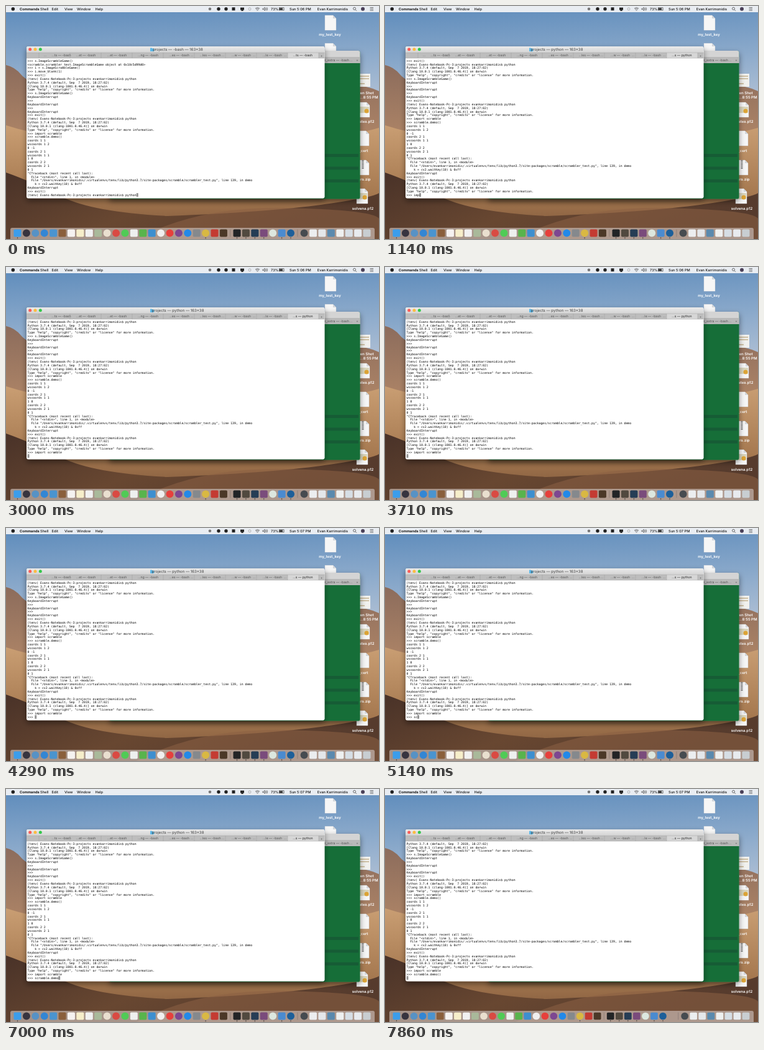
Recreate the animation shown at these times as an HTML page. Size 600 by 375 pixels, loop 8000 ms.

```html
<!DOCTYPE html>
<html lang="en">
<head>
<meta charset="utf-8">
<title>Shell session</title>
<style>
html, body { margin: 0; width: 100%; height: 100%; overflow: hidden; background: #6d4c38; }
svg { display: block; width: 100vw; height: 100vh; }
text { font-family: Inter, Roboto, sans-serif; white-space: pre; text-rendering: geometricPrecision; }
.mono text { font: 4.85px "DejaVu Sans Mono", "Noto Sans Mono", monospace; fill: #000; }
.menu text { font-size: 5.7px; fill: #151515; }
.label { font-size: 6px; font-weight: 600; fill: #fff; text-anchor: middle; }
.tab { font-size: 5.2px; fill: #555; text-anchor: middle; }
</style>
</head>
<body>
<svg viewBox="0 0 600 375" preserveAspectRatio="none">
  <defs>
    <linearGradient id="sky" x2=".12" y2="1">
      <stop stop-color="#5d8bbb"/><stop offset=".5" stop-color="#8faccc"/><stop offset="1" stop-color="#c2cbd9"/>
    </linearGradient>
    <linearGradient id="mountain" x2="0" y2="1">
      <stop stop-color="#8c6c5c"/><stop offset="1" stop-color="#b58a69"/>
    </linearGradient>
    <linearGradient id="sand" x2="0" y2="1">
      <stop stop-color="#c99e73"/><stop offset=".6" stop-color="#a67950"/><stop offset="1" stop-color="#7b5439"/>
    </linearGradient>
    <linearGradient id="shade" x2="1" y2=".4">
      <stop stop-color="#493228"/><stop offset=".5" stop-color="#684731"/><stop offset="1" stop-color="#563b2d"/>
    </linearGradient>
    <linearGradient id="bar" x2="0" y2="1">
      <stop stop-color="#ebebeb"/><stop offset="1" stop-color="#d3d3d3"/>
    </linearGradient>
    <filter id="shadow" x="-10%" y="-10%" width="120%" height="130%">
      <feDropShadow dx="0" dy="4" stdDeviation="5" flood-opacity=".45"/>
    </filter>
    <clipPath id="frame"><rect x="33" y="65" width="479.5" height="244.5" rx="3"/></clipPath>
  </defs>

  <rect width="600" height="210" fill="url(#sky)"/>
  <path d="M0 95Q14 98 24 110T60 128H545Q575 125 600 137V240H0Z" fill="url(#mountain)"/>
  <path d="M0 192Q40 205 90 212H500Q560 208 600 196V375H0Z" fill="url(#sand)"/>
  <path d="M0 268Q40 282 90 307T260 338Q430 331 520 318T600 298V375H0Z" fill="url(#shade)"/>
  <path d="M210 375Q310 322 450 325T600 342V375Z" fill="#8c6144" opacity=".55"/>

  <g id="desktop"></g>

  <g filter="url(#shadow)">
    <rect x="166" y="72" width="403.5" height="238.5" rx="3" fill="#176e39"/>
    <path d="M500 72H566.5Q569.5 72 569.5 75V92H500Z" fill="#d4d4d4"/>
    <path d="M500 82H569.5V92H500Z" fill="#b9b9b9"/>
    <path d="M513 240.5h54M513 261h54M513 281.5h54" stroke="#155c36" stroke-width="5"/>
  </g>
  <text class="tab" x="531" y="88.5">m_extra — -bash</text>
  <text class="tab" x="555" y="88.5">...</text>
  <text class="tab" x="565" y="88.5">+</text>

  <rect x="33" y="65" width="479.5" height="244.5" rx="3" fill="#fff" filter="url(#shadow)"/>
  <g clip-path="url(#frame)">
    <rect x="33" y="65" width="480" height="10" fill="url(#bar)"/>
    <rect x="33" y="75" width="480" height="9" fill="#bdbdbd"/>
    <rect x="453" y="75" width="50" height="9" fill="#d6d6d6"/>
    <path d="M33 75.2H513M33 84H513" stroke="#a6a6a6" stroke-width=".5"/>
    <circle cx="38.7" cy="69.8" r="2.5" fill="#fc5b57"/>
    <circle cx="47" cy="69.8" r="2.5" fill="#fdbc40"/>
    <circle cx="55.3" cy="69.8" r="2.5" fill="#34c84a"/>
    <path d="M232 67.5h2.5l1 1h2.7v4.5H232Z" fill="#5cb9e9"/>
    <g id="tabs"></g>
  </g>
  <text id="title" x="276.5" y="72" font-size="6.1" fill="#3d3d3d" text-anchor="middle"></text>
  <g class="mono">
    <rect id="cursor" width="2.9" height="5.8" fill="#929292"/>
    <g id="rows"></g>
  </g>

  <g class="menu" id="menu">
    <rect width="600" height="10" fill="#e9edf2"/>
    <circle cx="11.3" cy="4.8" r="2.8" fill="#222"/>
    <g fill="#222">
      <circle cx="328" cy="4.8" r="2.3" fill="#777"/>
      <circle cx="342" cy="4.8" r="2.7"/>
      <circle cx="354" cy="4.8" r="2.7"/>
      <rect x="363.5" y="2.2" width="5" height="5"/>
      <path d="M377 2.5h6v4h-6ZM378 8l2-2.5 2 2.5Z"/>
    </g>
    <g fill="none" stroke="#333" stroke-width=".7">
      <circle cx="392" cy="4.8" r="2" stroke="#999"/>
      <path d="M401 4q3.5-3 7 0M402.2 5.4q2.3-2 4.6 0M403.5 6.9h2"/>
      <path d="M413 4h1.5l2-1.7v5l-2-1.7H413ZM418 3q1.5 1.8 0 3.7M419.6 2.2q2.2 2.6 0 5.2"/>
      <rect x="439.5" y="2.8" width="7.5" height="4"/>
      <circle cx="560.5" cy="4.2" r="2"/><path d="M562 5.8l2 2"/>
      <path d="M585.5 2.5h5.5M585.5 4.8h5.5M585.5 7.1h5.5"/>
    </g>
    <rect x="440" y="3.3" width="5" height="3" fill="#333"/>
    <circle cx="574" cy="4.8" r="3" fill="#4a4058"/>
  </g>

  <path d="M7 375V360Q7 357 10 357H590Q593 357 593 360V375Z" fill="#d0c6c0" opacity=".62"/>
  <g id="dock"></g>
</svg>

<script>
const $ = id => document.getElementById(id);

function add(parent, tag, attrs, content) {
  const node = document.createElementNS('http://www.w3.org/2000/svg', tag);
  for (const key in attrs) node.setAttribute(key, attrs[key]);
  if (content) node.textContent = content;
  return parent.appendChild(node);
}

// Menu bar
const menu = $('menu');
[[22, 'Commands', 700], [55, 'Shell'], [73.5, 'Edit'], [94, 'View'], [114, 'Window'],
 [143.5, 'Help'], [426, '73%']].forEach(([x, word, weight = 500]) =>
  add(menu, 'text', { x, y: 6.8, 'font-weight': weight }, word));
const clock = add(menu, 'text', { x: 456, y: 6.8, 'font-weight': 500 });
add(menu, 'text', { x: 550, y: 6.8, 'font-weight': 500, 'text-anchor': 'end' }, 'Evan Karrimonidis');

// Desktop files
const desktop = $('desktop');
function file(x, y, badge) {
  add(desktop, 'path', { d: `M${x - 9} ${y - 12}h13l5 5v19h-18Z`, fill: '#f6f6f6', stroke: '#c9ccd0', 'stroke-width': .4 });
  add(desktop, 'path', { d: `M${x + 4} ${y - 12}v5h5Z`, fill: '#d3d6da' });
  if (badge === 'cert') {
    add(desktop, 'rect', { x: x - 7, y: y - 5, width: 15, height: 10, fill: '#d9d5bd' });
    add(desktop, 'circle', { cx: x + 4, cy: y + 2, r: 3.5, fill: '#dda436' });
  }
  if (badge === 'zip') add(desktop, 'path', { d: `M${x - 1} ${y - 12}v14`, stroke: '#777', 'stroke-width': 3, 'stroke-dasharray': '1.5 1' });
}
const label = (x, y, words) => add(desktop, 'text', { class: 'label', x, y }, words);
file(522, 27);
label(521, 48, 'my_test_key');
file(522, 72);
add(desktop, 'rect', { x: 563, y: 109, width: 23, height: 21, fill: '#f1f1ee' });
add(desktop, 'path', { d: 'M565 113h19M565 117h19M565 125h12', stroke: '#c4b18e', 'stroke-width': 1.5 });
label(574, 141.5, 'Screen Shot');
label(574, 148.5, '2019-1...8:55 PM');
file(576, 167, 'cert');
label(570, 188, 'certificates.p12');
file(575, 213);
label(569, 235, 'new_cert');
file(575, 260, 'zip');
label(571, 281, 'folders.zip');
file(573, 306, 'cert');
label(574, 327.5, 'solvena.p12');

// Tabs
const tabs = $('tabs');
['ts', 'et', 'et', 'ng', 'es', 'les', 'w', 'le'].forEach((name, i) => {
  const x = i ? 78.5 + 50 * i : 89;
  add(tabs, 'text', { class: 'tab', x, y: 81.3 }, `...${name} — -bash`);
  add(tabs, 'path', { d: `M${53 + 50 * i} 75v9`, stroke: '#9f9f9f', 'stroke-width': .5 });
  if (i > 3) add(tabs, 'text', { class: 'tab', x: 99 + 50 * i, y: 81.3 }, '...');
});
add(tabs, 'text', { class: 'tab', x: 63, y: 81.3 }, '...');
add(tabs, 'path', { d: 'M453 75v9M503 75v9', stroke: '#9f9f9f', 'stroke-width': .5 });
add(tabs, 'text', { class: 'tab', x: 507.7, y: 81.5 }, '+');
const activeTab = add(tabs, 'text', { class: 'tab', x: 477.5, y: 81.3, style: 'fill:#222' });

// Dock items: colour, then * for round and . for running
const dock = $('dock');
const icons = [];
function iconRun(firstSlot, spec) {
  spec.split(' ').forEach((item, i) => {
    const [, color, flags] = item.match(/^(\w+)([*.]*)$/);
    const node = add(dock, 'g', {});
    add(node, 'rect', { x: -6, y: -6, width: 12, height: 12, rx: flags.includes('*') ? 6 : 1.8, fill: '#' + color });
    if (flags.includes('.')) add(node, 'circle', { cy: 7.7, r: .7, fill: '#222' });
    icons.push({ node, slot: firstSlot + i });
  });
}
iconRun(0, '3b9deb. 37343f* 5792c5* 3386d4* 4a94cf 8a5f3b f5f2f0 f6eeca f1f1f1 a9b99a e9dfcf* d94a43* ' +
  '50cb56* eef0ef 58b44c 3d8fd0 f0efef* e6403c* 7d4791* 2389e8* 85898d d9b843*. c43b32 4b3827');
iconRun(24.5, '222426. 51493f. 263d55. 7a4b7c. dce7df* 4a8bd0. 1d5f99*.');
iconRun(32, '464b50* eceef0 e4e7ea 5a8aae eef0f0 d6dee5 e8ebef c8ced2');
const dividers = [24, 31.5].map(slot => ({
  slot, node: add(dock, 'path', { d: 'M-3.5 -6v12', stroke: '#756b66', 'stroke-width': .5 })
}));

function layDock(extra) {
  const pitch = 562 / (39 + extra);
  for (const { node, slot } of [...icons, ...dividers]) {
    const x = 18.5 + (slot + (slot > 31 ? extra : 0)) * pitch;
    node.setAttribute('transform', `translate(${x} 365.5) scale(${pitch / 14.4})`);
  }
}

// Shell session
const shell = '(tenv) Evans-Notebook-Pc-3:projects evankarrimonidis$ python';
const banner = [
  'Python 3.7.4 (default, Sep  7 2019, 18:27:02)',
  '[Clang 10.0.1 (clang-1001.0.46.4)] on darwin',
  'Type "help", "copyright", "credits" or "license" for more information.'
];
const interrupt = 'KeyboardInterrupt';
const pastLines = [
  '>>> s.ImageScrambleGame()',
  '<scramble.scrambler_test.ImageScrambleGame object at 0x10c5d99d0>',
  '>>> i = s.ImageScrambleGame()', '>>> i.move_blank(1)', '>>> exit()',
  shell, ...banner,
  '>>> s.ImageScrambleGame()', interrupt, '>>>', interrupt, '>>>', interrupt, '>>> exit()',
  shell, ...banner,
  '>>> import scramble', '>>> scramble.demo()',
  'coords 1 1', 'wscoords 1 2', '0 -1', 'coords 2 1', 'wscoords 1 1', '1 0',
  'coords 2 2', 'wscoords 2 1', '0 1',
  '^CTraceback (most recent call last):',
  '  File "<stdin>", line 1, in <module>',
  '  File "/Users/evankarrimonidis/.virtualenvs/tenv/lib/python3.7/site-packages/scramble/scrambler_test.py", line 139, in demo',
  '    k = cv2.waitKey(10) & 0xff',
  interrupt, '>>> exit()', shell
];

const ROWS = 38, LINE = 5.84, CHAR = 2.92, LEFT = 34.6, TOP = 88;
const rows = Array.from({ length: ROWS }, (_, i) =>
  add($('rows'), 'text', { x: LEFT, y: TOP + 1.75 + i * LINE }));

// Times below are in ticks of one seventh of a second.
const importStart = 6;
const demoKeys = [35, 36, 37, 38, 39, 40, 42, 43, 44, 45, 46, 48, 49, 50, 51];

function sessionAt(tick) {
  const lines = [...pastLines];
  if (tick >= 2) lines.push(...(tick >= 4 ? banner : ['']));
  if (tick >= 4) lines.push('>>> ' + 'import scramble'.slice(0, Math.max(0, tick - importStart + 1)));
  if (tick >= 21) lines.push(tick < 28 ? '' :
    '>>> ' + 'scramble.demo()'.slice(0, demoKeys.filter(key => key <= tick).length));
  if (tick >= 53) lines.push('');
  return lines.slice(-ROWS);
}

function draw(tick) {
  const lines = sessionAt(tick);
  rows.forEach((row, i) => row.textContent = lines[i]);
  $('cursor').setAttribute('x', LEFT + lines[ROWS - 1].length * CHAR);
  $('cursor').setAttribute('y', TOP - 2.9 + (ROWS - 1) * LINE);
  const job = tick < 3 ? '-bash' : 'python';
  $('title').textContent = `projects — ${job} — 163×38`;
  activeTab.textContent = tick < 3 ? '...ts — -bash' : '...s — python';
  clock.textContent = tick < 28 ? 'Sun 5:06 PM' : 'Sun 5:07 PM';
  layDock(Math.min(1, Math.max(0, (tick - 53) / 2)));
}

let shown = -1;
function loop() {
  const tick = Math.floor((performance.now() % 8000 + 4) * 7 / 1000) % 56;
  if (tick !== shown) draw(shown = tick);
  requestAnimationFrame(loop);
}
loop();
</script>
</body>
</html>
```
